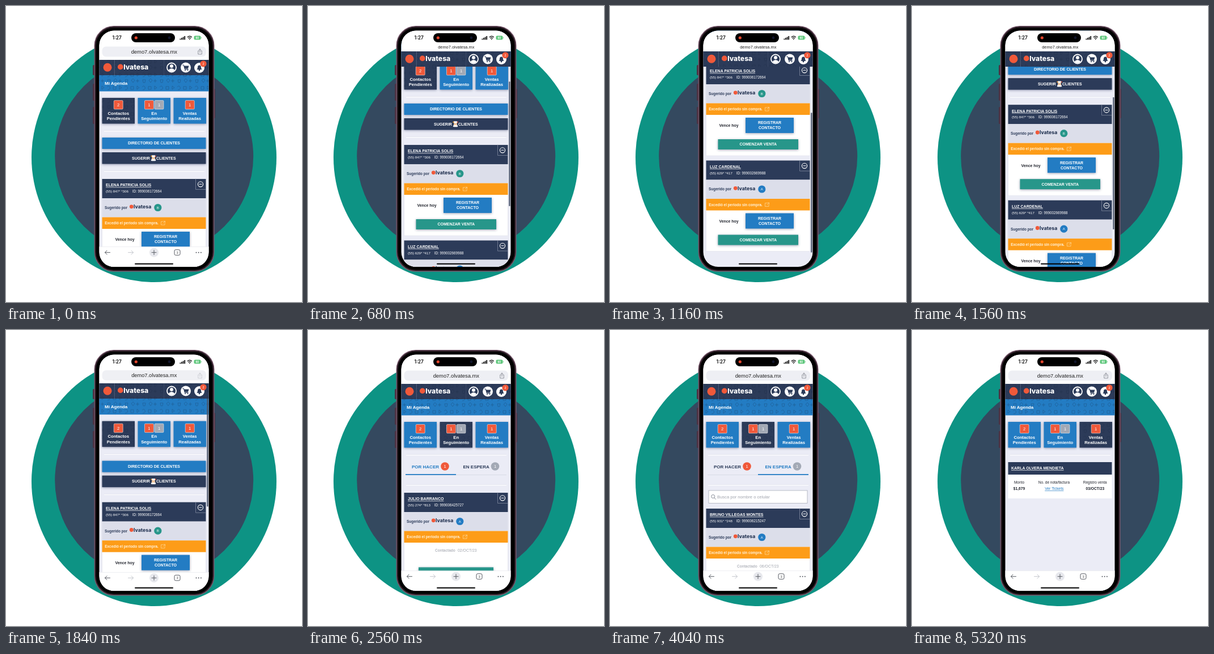
Write an HTML page that moves like this. It is 522x522 px and loops after 5360 ms.

```html
<!DOCTYPE html>
<html lang="es">
<head>
<meta charset="utf-8">
<title>Agenda</title>
<style>
  html, body { margin: 0; width: 100%; height: 100%; overflow: hidden; background: #fff; }
  svg { display: block; width: 100vw; height: 100vh; }
  text { font-family: "Liberation Sans", Arial, sans-serif; white-space: pre; }
  .brand { font-family: Inter, sans-serif; font-weight: 800; }
  .ui { font-family: Inter, sans-serif; }
  .raised { filter: drop-shadow(0 1.5px 2px rgba(40, 50, 90, .45)); }
</style>
</head>
<body>
<svg id="stage" viewBox="0 0 522 522"></svg>
<script>
const LOOP = 5360;
const NAVY = '#2c3b59', BLUE = '#237cc3', TEAL = '#27968a', ORANGE = '#f0593a',
      AMBER = '#fd9c18', GRAY = '#a3a9b5', LILAC = '#ebecf6', INK = '#23262f';

// Small drawing helpers; text is placed by its vertical centre.
const rect = (x, y, w, h, fill, more = '') =>
  `<rect x="${x}" y="${y}" width="${w}" height="${h}" fill="${fill}" ${more}/>`;
const circle = (x, y, r, fill, more = '') =>
  `<circle cx="${x}" cy="${y}" r="${r}" fill="${fill}" ${more}/>`;
const line = (d, color, w = 1, more = '') =>
  `<path d="${d}" fill="none" stroke="${color}" stroke-width="${w}" stroke-linecap="round" stroke-linejoin="round" ${more}/>`;
const text = (x, y, s, size, fill, more = '') =>
  `<text x="${x}" y="${y + size * .35}" font-size="${size}" fill="${fill}" ${more}>${s}</text>`;
const B = 'font-weight="700" ', MID = 'text-anchor="middle" ', U = 'text-decoration="underline" ';
const group = (id, inner, more = '') => `<g id="${id}" ${more}>${inner}</g>`;

const textured = (x, y, w, h, fill, more = '') =>
  rect(x, y, w, h, fill, more) + rect(x, y, w, h, 'url(#doodles)');
const button = (x, y, w, h, fill, lines) =>
  rect(x, y, w, h, fill, 'class="raised"') +
  lines.map((s, i) => text(x + w / 2, y + h / 2 + (i - (lines.length - 1) / 2) * 9, s, 7, '#fff', B + MID)).join('');
const rule = y => rect(173, y, 177, 1.2, '#fff') + rect(173, y - .8, 177, .6, '#dcdeea');
const brand = (x, y, size, fill) =>
  circle(x, y - size * .05, size * .4, ORANGE) + text(x + size * .44, y, 'lvatesa', size, fill, 'class="brand"');

function tiles(active) {
  const data = [['Contactos', 'Pendientes', ['2']], ['En', 'Seguimiento', ['1', '1']], ['Ventas', 'Realizadas', ['1']]];
  return data.map(([a, b, counts], i) => {
    const x = 169.5 + 63 * i, c = x + 28.7;
    const back = i === active ? textured(x, 162, 57.5, 45.5, NAVY, 'class="raised"')
                              : rect(x, 162, 57.5, 45.5, BLUE, 'class="raised"');
    const badges = counts.map((n, j) => {
      const bx = c - 8 + (j - (counts.length - 1) / 2) * 17.6;
      return rect(bx, 166.5, 16, 15.5, j ? GRAY : ORANGE, 'rx="1.5" stroke="#fff" stroke-opacity=".75" stroke-width=".7"') +
             text(bx + 8, 174.4, n, 7.5, '#fff', MID);
    }).join('');
    return back + badges + text(c, 189, a, 7.7, '#fff', B + MID) + text(c, 198.7, b, 7.7, '#fff', B + MID);
  }).join('');
}

// Client card: navy title, suggestion row, amber notice, white body.
function card(y, name, phone, id, letter, body) {
  return rect(169.5, y, 183, 160, '#fff', 'stroke="#dfe1ea" stroke-width=".6"') +
    rect(169.5, y, 183, 34, NAVY) +
    text(176, y + 11, name, 7, '#fff', B + U) +
    text(176, y + 22, phone, 6.2, '#fff') + text(222.8, y + 22, 'ID: ' + id, 6.3, '#fff') +
    line(`M334.5 ${y}v18.5h18`, '#8d96aa', .7) +
    circle(343, y + 9.3, 4.6, 'none', 'stroke="#fff" stroke-width="1.1"') + line(`M340.8 ${y + 9.3}h4.4`, '#fff', 1.1) +
    rect(169.5, y + 34, 183, 33.5, '#dcdeea') +
    text(174, y + 50.7, 'Sugerido por', 6.45, NAVY, B) +
    brand(221.3, y + 49.3, 8.6, NAVY) +
    circle(267.8, y + 50.5, 6.6, letter === 'B' ? TEAL : BLUE) + text(267.8, y + 50.6, letter, 6, '#fff', MID) +
    rect(169.5, y + 67.5, 183, 20.5, AMBER) +
    text(174.3, y + 78, 'Excedió el periodo sin compra.', 6.4, '#fff3dc', B) +
    line(`M277 ${y + 75}h-3.5v6h6.5v-3M276.5 ${y + 78.5}l4-4m-2.5 0h2.5v2.5`, '#ffdca0', .7) + body;
}
const dueBody = y =>
  text(192.5, y + 107, 'Vence hoy', 6.9, INK, B) +
  button(239, y + 93, 85, 27, BLUE, ['REGISTRAR', 'CONTACTO']) +
  button(190.5, y + 131, 141.5, 18, TEAL, ['COMENZAR VENTA']);
const contactBody = (y, date) =>
  text(224, y + 101.3, 'Contactado', 6.5, '#b4b7be', B) + text(264, y + 101.3, date, 6.9, '#a2a6ae') +
  button(195, y + 131.5, 132, 18, TEAL, ['COMENZAR VENTA']);

function tabs(active) {
  return [['POR HACER', 183, 241.5, ORANGE], ['EN ESPERA', 273.5, 330, GRAY]].map(([s, x, cx, color], i) =>
    text(x, 241, s, 8, i === active ? BLUE : NAVY, B) +
    circle(cx, 240.5, 7.3, color) + text(cx, 240.6, '1', 7.5, '#fff', MID) +
    (i === active ? rect(172 + 89 * i, 254, 89, 1.8, BLUE) : rect(172 + 89 * i, 255, 89, .8, '#d4d7e2'))
  ).join('') + rule(273);
}

const helper = circle(260, 268.6, 3, '#f3c9a0') + rect(256.6, 263.2, 6.8, 3, '#fff', 'rx="1.4"') +
  rect(256, 270.2, 8, 3, '#fff', 'rx="1"') + circle(256.4, 264.8, 1.1, AMBER) + circle(263.8, 264.8, 1.1, ORANGE);

const pages = {
  pending: tiles(0) + rule(220) +
    button(169.5, 232, 183, 20, BLUE, ['DIRECTORIO DE CLIENTES']) +
    rect(169.5, 258, 183, 20.5, NAVY, 'class="raised"') +
    text(222, 268.3, 'SUGERIR', 7, '#fff', B) + text(265, 268.3, 'CLIENTES', 7, '#fff', B) + helper +
    rule(291) +
    card(305, 'ELENA PATRICIA SOLIS', '(55) 847* *306', '999006172664', 'B', dueBody(305)) +
    card(473.5, 'LUZ CARDENAL', '(55) 629* *417', '999002669988', 'A', dueBody(473.5)),
  todo: tiles(1) + rule(220) + tabs(0) +
    card(287, 'JULIO BARRANCO', '(55) 274* *813', '999006425727', 'A', contactBody(287, '02/OCT/23')),
  waiting: tiles(1) + rule(220) + tabs(1) +
    rect(174, 283, 174, 22.5, '#fff', 'stroke="#a9adba" stroke-width=".8"') +
    circle(181.7, 293.5, 3, 'none', 'stroke="#777d8a" stroke-width=".9"') + line('M184 296l2.4 2.4', '#777d8a', .9) +
    text(189, 294.6, 'Busca por nombre o celular', 7.6, '#a0a4ad') +
    card(315, 'BRUNO VILLEGAS MONTES', '(55) 931* *248', '999006215247', 'A', contactBody(315, '06/OCT/23')),
  sales: tiles(2) + rule(220) +
    rect(169.5, 233, 183, 64, '#fff') + rect(169.5, 233, 183, 22, NAVY) +
    text(175, 243.6, 'KARLA OLVERA MENDIETA', 7, '#fff', B + U) +
    text(189, 268.5, 'Monto', 6.5, INK, MID) + text(250.5, 268.5, 'No. de nota/factura', 6.5, INK, MID) +
    text(322.7, 268.5, 'Registro venta', 6.5, INK, MID) +
    text(189, 280, '$1,679', 6.7, INK, B + MID) + text(250.8, 280, 'Ver Tickets', 6.8, BLUE, U + MID) +
    text(322.8, 280, '03/OCT/23', 6.7, INK, B + MID)
};

const header = textured(164, 95, 194, 27, NAVY) +
  circle(179, 108.3, 7.5, ORANGE) + rect(190.8, 95, .8, 27, '#5a6680') +
  brand(201.8, 108, 12.2, '#fff') +
  rect(278, 95, .6, 27, '#404d69') +
  circle(292, 108.5, 8, NAVY, 'stroke="#fff" stroke-width="1.8"') + circle(292, 106, 3, '#fff') +
  '<path d="M286.5 113q5.5-6 11 0q-5.5 5.5-11 0" fill="#fff"/>' +
  circle(317, 108.5, 9, '#fff') +
  `<path d="M313.5 105.5h9l-1.5 5h-6z" fill="${NAVY}"/>` + line('M311.5 104h1.8l2 7.5h6', NAVY, 1) +
  circle(316, 113.3, 1, NAVY) + circle(320.5, 113.3, 1, NAVY) +
  circle(341, 109, 9, '#fff') +
  `<path d="M336.5 112q1.5-1.5 1.5-4q0-3.5 3-3.5t3 3.5q0 2.5 1.5 4z" fill="${NAVY}"/>` + circle(341, 113, 1.4, NAVY) +
  circle(348, 101.8, 5.6, ORANGE) + text(348, 101.8, '2', 5.5, '#fff', MID);

const statusBar = text(187.5, 56, '1:27', 8.4, '#111', 'class="ui" font-weight="600"') +
  rect(221, 48, 77, 16, '#000', 'rx="8"') + circle(229.3, 56, 2.6, '#e2452c') + circle(288, 56, 2.4, '#10142a') +
  [0, 1, 2, 3].map(i => rect(306.5 + i * 2.6, 57.5 - i * 1.5, 1.8, 2 + i * 1.5, '#111', 'rx=".5"')).join('') +
  line('M320.2 54.8q3.6-3.4 7.2 0M321.8 56.8q2-1.8 4 0', '#111', 1.2) + circle(323.8, 58.6, .9, '#111') +
  rect(331.5, 52.5, 12, 7, '#5fc77c', 'rx="2"') + rect(344, 54.7, 1, 2.6, '#9bd9ac', 'rx=".5"') +
  text(337.3, 56.1, '60', 5, '#fff', B + MID);

const toolbar = rect(164, 424.5, 194, 80, '#fff') + rect(164, 424.5, 194, .6, '#e3e4ea') +
  line('M183.5 434.7h-9m3.5-3.5l-3.5 3.5l3.5 3.5', '#555961') +
  line('M215.5 434.7h9m-3.5-3.5l3.5 3.5l-3.5 3.5', '#c3c6cc') +
  circle(261, 434.7, 8, '#e7e8ed') + line('M257 434.7h8m-4-4v8', '#555961') +
  rect(297, 429.8, 10, 9.6, 'none', 'rx="2.2" stroke="#555961"') + text(302, 434.7, '3', 5.8, '#444', MID) +
  [335.5, 339.7, 343.9].map(x => circle(x, 434.7, 1, '#555961')).join('');

const shell = [[104, 18], [137, 30], [178, 30]].map(([y, h]) => rect(153, y, 4, h, '#4a3041', 'rx="1.5"')).join('') +
  rect(365, 146, 4, 52, '#4a3041', 'rx="1.5"') +
  rect(156.3, 35.8, 210.4, 432, '#0b090b', 'rx="34" stroke="#76566a" stroke-width="1.6"') +
  rect(158.3, 37.8, 206.4, 428, '#000', 'rx="32" stroke="#302029" stroke-width="1.2"');

document.getElementById('stage').innerHTML =
  `<defs>
    <clipPath id="screen"><rect x="164.5" y="43.5" width="193" height="416.5" rx="26"/></clipPath>
    <pattern id="doodles" width="31" height="23" patternUnits="userSpaceOnUse">
      <path d="M3 4h5v5h-5zM14 3l4 3l-4 3zM23 5q3-4 5 0t-4 5M4 16l3-3l3 3l-3 4zM15 14v6m-3-3h6M24 15h5l-1 5h-3z"
        fill="none" stroke="#101c3c" stroke-opacity=".3" stroke-width=".8"/>
    </pattern>
  </defs>` +
  rect(0, 0, 522, 522, '#fff') +
  `<ellipse cx="261" cy="267" rx="216" ry="220" fill="#0d9384"/>` + circle(261.2, 265, 175, '#34495f') + shell +
  `<g clip-path="url(#screen)">` +
    rect(164, 43, 194, 418, LILAC) +
    group('content', textured(164, 122, 194, 28.5, BLUE) + text(174, 136.3, 'Mi Agenda', 8, '#fff', B) +
      Object.entries(pages).map(([id, inner]) => group(id, inner)).join('')) +
    group('thumb', rect(354.3, 0, 2.2, 1, '#4c566b')) +
    group('top', rect(164, 20, 194, 75.2, '#fff') + header) +
    group('pill', rect(169.5, 71.5, 183.5, 18, '#eeeff4', 'rx="7"')) +
    group('url', text(0, 0, 'demo7.olvatesa.mx', 9.4, '#222', MID)) +
    group('share', line('M340.3 79h-1.5v6h6.5v-6h-1.5M342 82v-6m-1.8 1.6l1.8-1.8l1.8 1.8', '#7b7f88', .8)) +
    statusBar + group('toolbar', toolbar) +
    rect(227, 453.8, 68, 1.9, '#000', 'rx="1"') +
  '</g>';

const el = id => document.getElementById(id);
const clamp = v => Math.max(0, Math.min(1, v));
const ease = (t, from, to) => { const u = clamp((t - from) / (to - from)); return u * u * (3 - 2 * u); };
const move = (id, x, y) => el(id).setAttribute('transform', `translate(${x} ${y})`);

function draw(t) {
  const scroll = 201 * (ease(t, 443, 1100) - ease(t, 1360, 1865));
  const fold = clamp(scroll / 20);   // how far the browser bars are tucked away
  const page = t < 2240 ? 'pending' : t < 3400 ? 'todo' : t < 4680 ? 'waiting' : 'sales';
  for (const id in pages) el(id).style.display = id === page ? '' : 'none';

  move('content', 0, -scroll);
  move('top', 0, -15 * fold);
  move('toolbar', 0, 38 * fold);
  move('pill', 0, -7 * fold);
  el('pill').style.opacity = 1 - fold;
  el('url').setAttribute('transform', `translate(261.3 ${80.3 - 7.5 * fold}) scale(${1 - .21 * fold})`);
  el('share').style.opacity = clamp(1 - fold * 10);

  const head = 110 + scroll * .39, tail = 310 + 8 * fold + scroll * .58;
  el('thumb').setAttribute('transform', `translate(0 ${head}) scale(1 ${tail - head})`);
  el('thumb').style.opacity = t > 443 ? 1 - clamp((t - 1960) / 160) : 0;
}

function tick() {
  draw(performance.now() % LOOP);
  requestAnimationFrame(tick);
}
tick();
</script>
</body>
</html>
```
